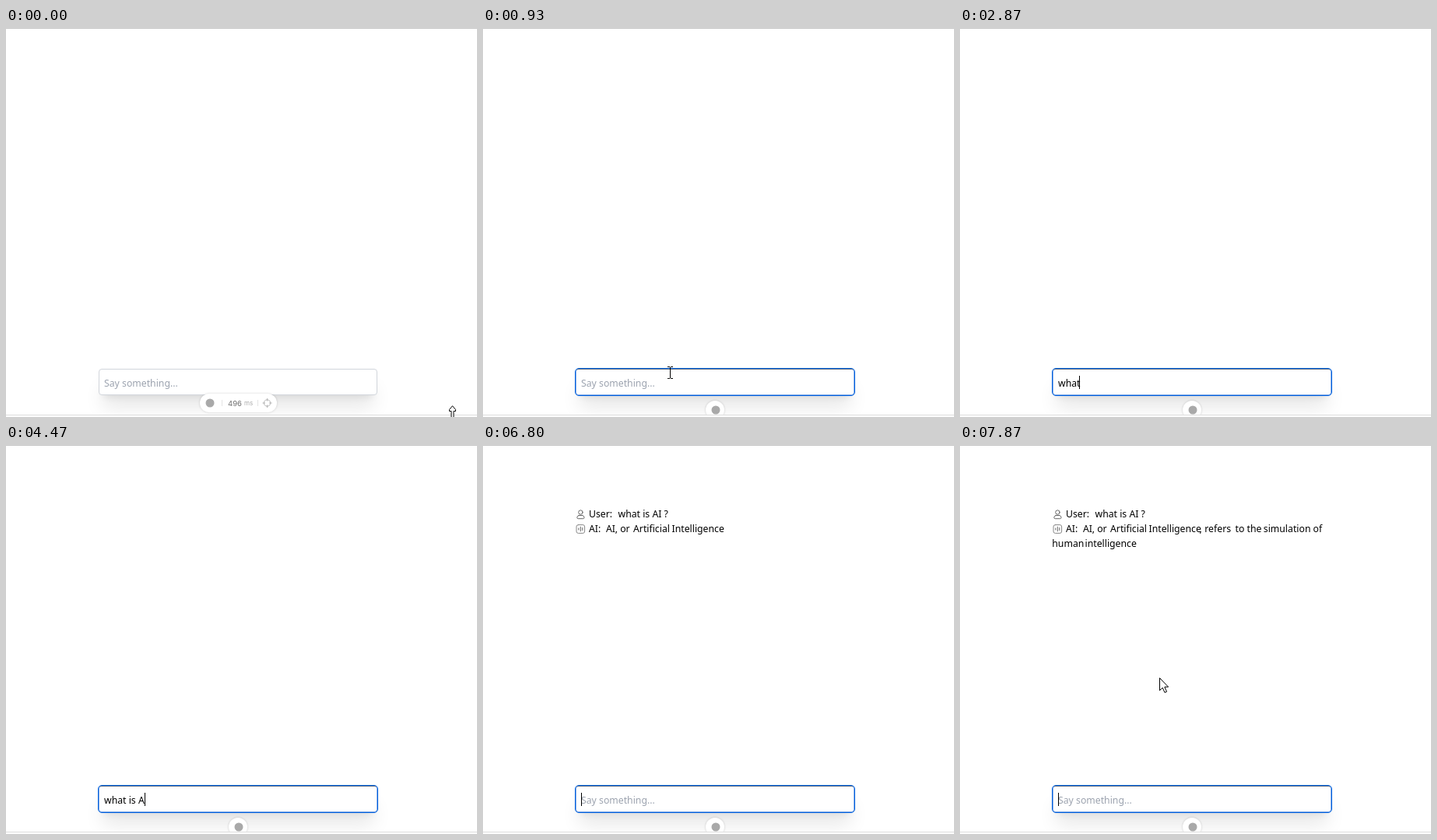
These frames come from a looping animation (605 by 500 pixels, 8 s). An HTML page:

```html
<!DOCTYPE html>
<html lang="en">
<head>
<meta charset="utf-8">
<title>Chat</title>
<style>
  html, body { margin: 0; width: 100%; height: 100%; overflow: hidden; background: #fff; }
  #stage { position: relative; width: 605px; height: 500px; overflow: hidden; }
  #page {
    position: absolute; width: 605px; height: 497px; overflow: hidden; box-sizing: border-box;
    border-top: 1px solid #c6c6c6;
  }
  #line { position: absolute; top: 497px; width: 605px; height: 1px; background: #dcdcdc; }
  #box {
    position: absolute; left: 119px; top: 437px; width: 358px; height: 34px; box-sizing: border-box;
    border: 1px solid #d1d5db; border-radius: 4px; background: #fff;
    box-shadow: 0 20px 25px -5px rgba(0,0,0,.1), 0 8px 10px -6px rgba(0,0,0,.1);
  }
  #box.focus { border-color: #80a9e6; border-top-color: #5c6b80; outline: 1px solid #0060df; }
  #pill {
    position: absolute; height: 24px; border-radius: 12px; background: #fff;
    overflow: hidden; box-shadow: 0 0 3px rgba(0,0,0,.18);
  }
  #pill svg { position: absolute; left: 0; top: 0; }
  #stage > svg { position: absolute; left: 0; top: 0; }
  text { white-space: pre; }
  .chat { font: 12.25px "Noto Sans", sans-serif; }
  .icon { fill: none; stroke: #666; stroke-width: 1; stroke-linecap: round; }
</style>
</head>
<body>
<div id="stage">
  <div id="page">
    <div id="box"></div>
    <div id="pill">
      <svg width="99" height="24">
        <circle cx="13" cy="12" r="5.5" fill="#a9a9a9"/>
        <g id="details">
          <path d="M28.5 8v8M74.5 8v8" stroke="#e4e4e4"/>
          <g font-family="Inter, sans-serif">
            <text x="36" y="15.5" font-size="9.5" fill="#707070">496</text>
            <text x="57" y="15" font-size="8" fill="#aaa">ms</text>
          </g>
          <g fill="none" stroke="#b4b4b4">
            <circle cx="86.5" cy="12" r="4.2"/>
            <path d="M86.5 6v3.5M86.5 14.5V18M80.5 12H84M89 12h3.5"/>
          </g>
        </g>
      </svg>
    </div>
  </div>
  <div id="line"></div>
  <svg width="605" height="500">
    <g class="chat">
      <text id="input" x="126" y="461"></text>
      <g id="question">
        <g class="icon">
          <circle cx="125.4" cy="86.5" r="2.7"/>
          <path d="M123 90.5h5q2 .7 2 2.8q0 1.4-1.5 1.4h-6.2q-1.5 0-1.5-1.4q0-2.1 2.2-2.8z"/>
        </g>
        <text x="136" y="93">User:</text>
        <text x="173.5" y="93">what is AI ?</text>
      </g>
      <g id="answer">
        <g class="icon">
          <rect x="120" y="102.6" width="10.6" height="10.8" rx="2.4" stroke="#888"/>
          <path d="M122.8 107v2M125.3 105.2v5.6M127.8 106.4v3.2"/>
        </g>
      </g>
    </g>
    <rect id="caret" y="447" width="1" height="17"/>
    <g id="mouse">
      <path id="resize" fill="#fff" stroke="#000" d="M0 .7L4 5.5V7.5H1.5V22H-1.5V7.5H-4V5.5Z"/>
      <path id="arrow" fill="#fff" stroke="#000" d="M.5 .5V16.5L4.2 13L7 19.2L9.5 18L6.8 12H11.6Z"/>
      <path id="beam" fill="none" stroke="#000" d="M-3 -7.5H0M1 -7.5H4M.5 -7V7M-3 7.5H0M1 7.5H4"/>
    </g>
  </svg>
</div>
<script>
const LOOP = 8000, BLINK = 530;
const $ = id => document.getElementById(id);
const show = (el, on) => { el.style.display = on ? '' : 'none'; };

// [time, typed text, caret x]
const keys = [
  [400, '', 126], [1470, '', 126], [1670, 'w', 135], [2070, '', 126],
  [2470, 'w', 135], [2600, 'wh', 142], [2730, 'wha', 148], [2870, 'what', 153],
  [3200, 'what ', 157], [3470, 'what i', 161], [3530, 'what is', 166],
  [3670, 'what is ', 170], [4470, 'what is A', 178], [4670, 'what is AI', 182],
  [4800, 'what is AI ', 185], [5200, 'what is AI ?', 191], [5400, 'what is AI ? ', 195]
];
const SENT = 5600;

// [time, word, x, baseline]
const words = [
  [6400, 'AI:', 136, 112], [6400, 'AI', 158, 112], [6470, ',', 169.8, 112], [6600, 'or', 176.2, 112],
  [6670, 'Artificial', 193, 112], [6800, 'Intelligence', 242.5, 112], [6870, ',', 307.5, 112],
  [7070, 'refers', 314.3, 112], [7200, 'to', 353.6, 112], [7270, 'the', 368.6, 112],
  [7470, 'simulation', 389.8, 112], [7530, 'of', 453.6, 112],
  [7670, 'human', 118.3, 131], [7800, 'intelligence', 160.5, 131]
].map(([time, word, x, y]) => {
  const el = document.createElementNS('http://www.w3.org/2000/svg', 'text');
  el.textContent = word;
  el.setAttribute('x', x);
  el.setAttribute('y', y);
  $('answer').append(el);
  return { time, el };
});

// [time, x, y]
const entering = [[70, 573, 485], [200, 500, 474], [400, 250, 455], [670, 240, 443]];
const returning = [[7000, 242, 430], [7270, 273, 297], [7330, 273, 297], [7870, 256, 299]];

const clamp = v => Math.min(1, Math.max(0, v));
const mix = (a, b, p) => a + (b - a) * p;
const ease = p => p * p * (3 - 2 * p);

function along(path, t) {
  let i = 0;
  while (i < path.length - 2 && t >= path[i + 1][0]) i++;
  const [t0, x0, y0] = path[i], [t1, x1, y1] = path[i + 1];
  const p = clamp((t - t0) / (t1 - t0));
  return [mix(x0, x1, p), mix(y0, y1, p)];
}

function drawInput(t) {
  const key = keys.filter(k => k[0] <= t).pop();
  const sent = t >= SENT;
  const typed = key && !sent ? key[1] : '';
  $('input').textContent = typed || 'Say something...';
  $('input').setAttribute('fill', typed ? '#000' : '#9ca3af');
  $('box').className = key ? 'focus' : '';
  show($('caret'), key && Math.floor((t - key[0]) / BLINK) % 2 === 0);
  $('caret').setAttribute('x', key && !sent ? key[2] : 126);
}

function drawPill(t) {
  const p = ease(clamp((t - 200) / 400));
  const width = mix(99, 24, p);
  $('pill').style.width = width + 'px';
  $('pill').style.left = 298.3 - width / 2 + 'px';
  $('pill').style.top = mix(469, 478, p) + 'px';
  $('details').style.opacity = 1 - p;
}

function drawMouse(t) {
  const back = t >= 7000;
  const [x, y] = along(back ? returning : entering, t).map(Math.round);
  const overBox = x > 118 && x < 478 && y > 434 && y < 473;
  const shape = t < 70 ? 'resize' : overBox ? 'beam' : 'arrow';
  show($('mouse'), t < 1670 || back);
  $('mouse').setAttribute('transform', `translate(${x + (shape === 'resize' ? 0.5 : 0)} ${y})`);
  for (const id of ['resize', 'arrow', 'beam']) show($(id), id === shape);
}

function draw(now) {
  const t = now % LOOP;
  drawInput(t);
  drawPill(t);
  drawMouse(t);
  show($('question'), t >= SENT);
  show($('answer'), t >= 6400);
  for (const { time, el } of words) show(el, t >= time);
}

const start = performance.now();
function frame() {
  draw(performance.now() - start);
  requestAnimationFrame(frame);
}
frame();
</script>
</body>
</html>
```
